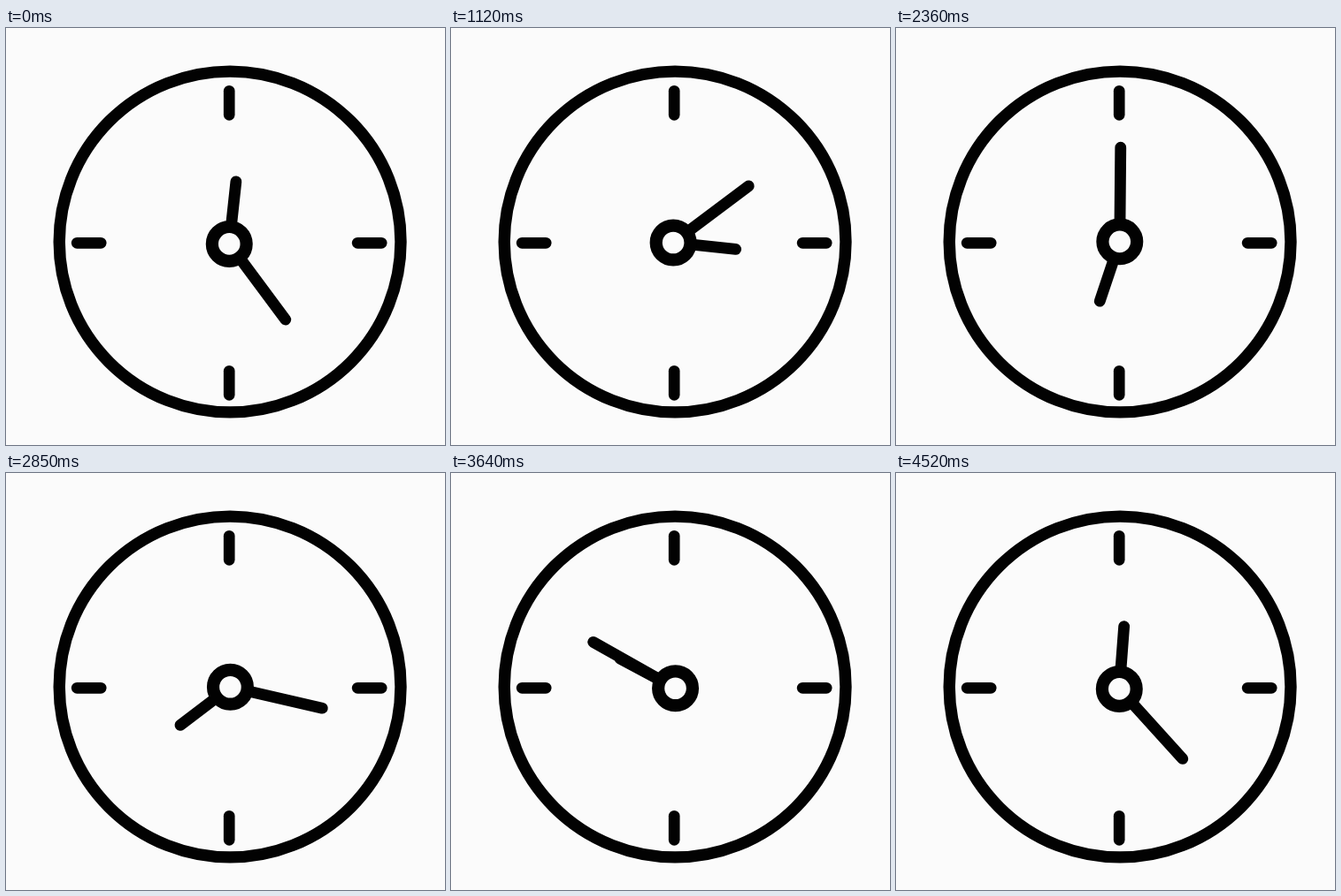
Write an HTML page with a canvas that moves like this. It is 496 px wide and 472 px high and loops after 4560 ms.

```html
<!DOCTYPE html>
<html lang="en">
<head>
<meta charset="utf-8">
<title>Clock</title>
<style>
html, body { margin: 0; width: 100%; height: 100%; overflow: hidden; background: #fbfbfb; }
canvas { display: block; }
</style>
</head>
<body>
<canvas id="stage" width="496" height="472"></canvas>
<script>
const ctx = document.getElementById('stage').getContext('2d');
const LOOP = 4560;
const START = 143.2;
const TURNS = 3 * 360;
const INK = '#020202', PAPER = '#fbfbfb';
const CENTER = { x: 252.4, y: 243.1 };

// The minute hand runs at an uneven pace through a few points: time in ms, degrees from twelve
const PACE = [
  [0, START], [1670, 545.2], [2360, 720.3], [2850, 822.7],
  [3640, 1019.2], [4420, 1204], [LOOP, START + TURNS]
];

function minuteAngle(time) {
  const next = PACE.findIndex(([t]) => t > time);
  const [t0, a0] = PACE[next - 1];
  const [t1, a1] = PACE[next];
  return a0 + (a1 - a0) * (time - t0) / (t1 - t0);
}

function polar(from, degrees, radius) {
  const a = degrees * Math.PI / 180;
  return { x: from.x + radius * Math.sin(a), y: from.y - radius * Math.cos(a) };
}

function bar(from, to, width) {
  ctx.lineWidth = width;
  ctx.beginPath();
  ctx.moveTo(from.x, from.y);
  ctx.lineTo(to.x, to.y);
  ctx.stroke();
}

function ring(center, radius, width) {
  ctx.lineWidth = width;
  ctx.beginPath();
  ctx.arc(center.x, center.y, radius, 0, Math.PI * 2);
  ctx.fill();
  ctx.stroke();
}

function drawFace() {
  const middle = { x: 253.1, y: 242 };
  ring(middle, 192.9, 13.4);
  const tickCenter = { x: 252.2, y: 243.3 };
  for (let angle = 0; angle < 360; angle += 90) {
    bar(polar(tickCenter, angle, 145), polar(tickCenter, angle, 172), 12.7);
  }
}

function drawHands(minute) {
  const hour = 6.1 + (minute - START) / 3;
  // The pivot sits slightly off centre, opposite the hour hand
  const pivot = polar(CENTER, hour, -1.3);
  bar(pivot, polar(pivot, hour, 71), 12.8);
  bar(pivot, polar(pivot, minute, 106.6), 12.8);
  ring(pivot, 19.4, 14.2);
}

function draw(time) {
  ctx.fillStyle = PAPER;
  ctx.strokeStyle = INK;
  ctx.lineCap = 'round';
  ctx.fillRect(0, 0, 496, 472);
  drawFace();
  drawHands(minuteAngle(time));
}

function frame() {
  draw(performance.now() % LOOP);
  requestAnimationFrame(frame);
}
frame();
</script>
</body>
</html>
```
